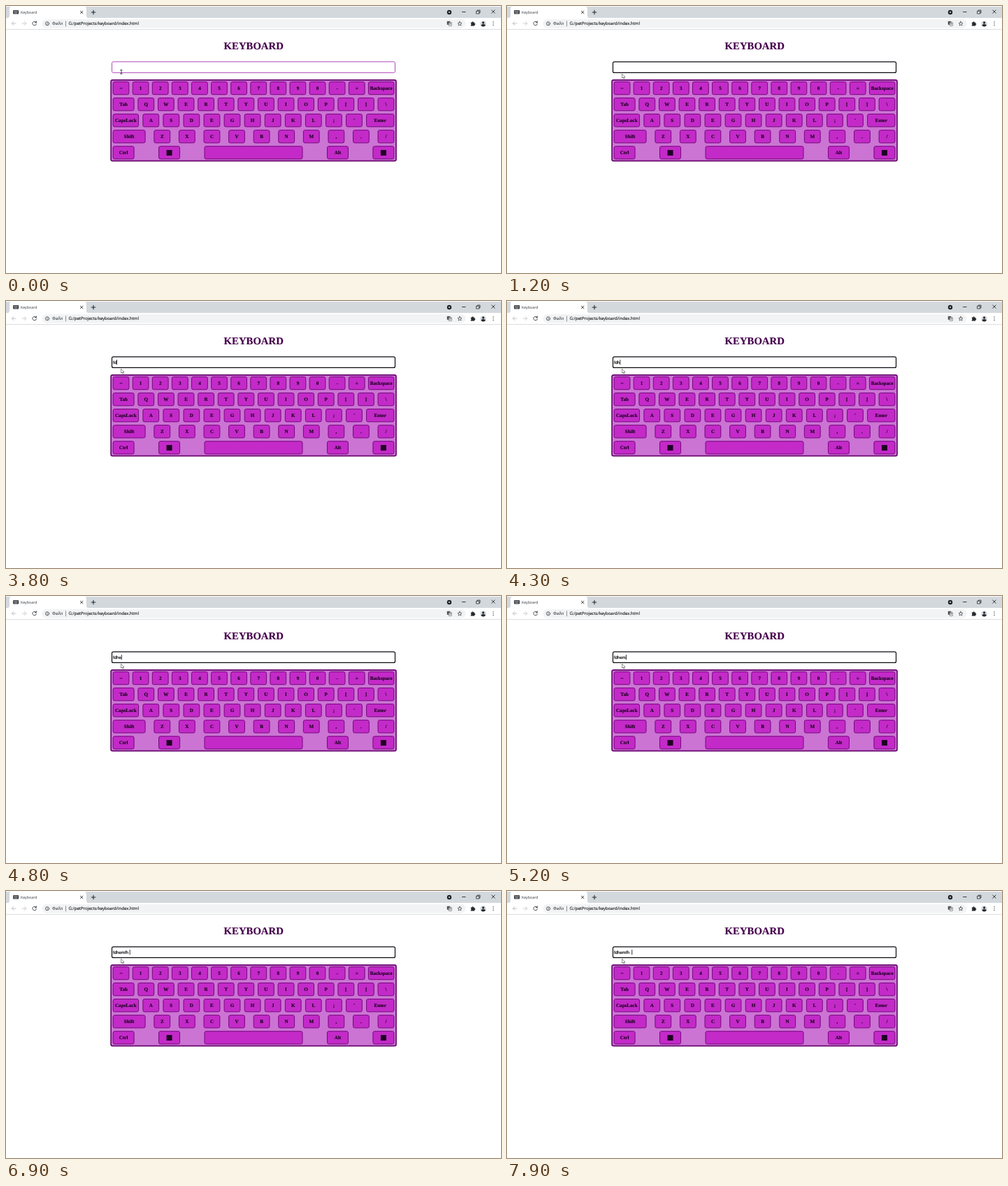
Recreate the animation shown at these times as an HTML page. Size 708x382 px, loop 8 s.

```html
<!DOCTYPE html>
<html lang="en">
<head>
<meta charset="utf-8">
<title>Keyboard</title>
<style>
  html, body { margin: 0; width: 100%; height: 100%; overflow: hidden; background: #fff; }
  svg { display: block; width: 708px; height: 382px; }
  text { text-rendering: geometricPrecision; }
  .ui { font-family: "Open Sans", "Noto Sans", sans-serif; }
  .serif { font-family: "Liberation Serif", "Times New Roman", serif; font-weight: bold; text-anchor: middle; }
  .typed { font: 6.1px "Liberation Sans", Arial, sans-serif; white-space: pre; }
  .line { fill: none; stroke-linecap: round; stroke-linejoin: round; }
</style>
</head>
<body>
<svg viewBox="0 0 708 382">
  <rect width="708" height="382" fill="#fff"/>

  <!-- tab strip -->
  <rect y="1" width="708" height="16" fill="#d2d8dc"/>
  <path d="M2 17Q5 17 5 14V4Q5 1 8 1H112Q115 1 115 4V14Q115 17 118 17Z" fill="#fff"/>
  <rect x="10" y="6" width="8.2" height="5.4" rx=".8" fill="#3c3f44"/>
  <path d="M11.2 7.6H17M11.2 9H17M12.4 10.3H15.8" stroke="#fff" stroke-width=".6" stroke-dasharray="1 .5"/>
  <text class="ui" x="21" y="10.8" font-size="5.3" fill="#34373c">Keyboard</text>
  <g class="line" stroke="#26292d" stroke-width=".9">
    <path d="M106.4 7.2l3.6 3.6m0-3.6l-3.6 3.6"/>
    <path d="M122.2 9h5.6M125 6.2v5.6" stroke-width="1.1"/>
    <path d="M652.5 8.5h4.6"/>
    <path d="M673 7.2h3.8v3.8H673zM674.2 7V6h3.8v3.8h-1" stroke-width=".8"/>
    <path d="M694.7 5.9l4.4 4.4m0-4.4l-4.4 4.4"/>
  </g>
  <circle cx="634" cy="9" r="3.2" fill="#1c1f23"/>
  <path d="M632.5 8.2h3l-1.5 2z" fill="#fff"/>

  <!-- toolbar -->
  <path d="M0 33.5H708" stroke="#dcdee1"/>
  <rect x="51.5" y="19" width="606" height="12.4" rx="6.2" fill="#f1f3f4"/>
  <g class="line" stroke-width=".9">
    <path d="M14 25H8.4m2.6-2.6L8.4 25l2.6 2.6" stroke="#b9bcc0"/>
    <path d="M23.2 25h5.6m-2.6-2.6l2.6 2.6-2.6 2.6" stroke="#c6c9cc"/>
    <path d="M43 23.2a2.8 2.8 0 1 0 .5 2.5M43.4 21.8v2h-2" stroke="#34373c"/>
    <circle cx="59" cy="25.2" r="2.6" stroke="#44474c" stroke-width=".8"/>
    <path d="M59 25v1.4M59 23.8v.1" stroke="#44474c" stroke-width=".8"/>
    <path d="M85.5 21.8v7" stroke="#77797e" stroke-width=".8"/>
    <path d="M649 22.2l.9 2 2.1.2-1.6 1.4.5 2.1-1.9-1.1-1.9 1.1.5-2.1-1.6-1.4 2.1-.2z" stroke="#34373c" stroke-width=".7"/>
  </g>
  <g class="ui" font-size="6.05" stroke-width=".12">
    <text x="66" y="27.4" fill="#54575c" stroke="#54575c">Файл</text>
    <text x="89.5" y="27.4" fill="#17191c" stroke="#17191c">G:/petProjects/keyboard/index.html</text>
  </g>
  <rect x="630.8" y="21.8" width="4.4" height="5" rx=".5" fill="#4c5055"/>
  <rect x="633.2" y="23.4" width="4.2" height="5" rx=".5" fill="#fff" stroke="#4c5055" stroke-width=".6"/>
  <path class="line" d="M634.2 25h2.2m-1.1-.6v.6m.9 0l-1.8 2m.2-1.4l1.5 1.4" stroke="#4c5055" stroke-width=".5"/>
  <path d="M664.8 23.4h1.6a1.1 1.1 0 0 1 2.2 0h1.6v1.5a1.1 1.1 0 0 1 0 2.2v1.5h-5.4v-1.7a1 1 0 0 0 0-1.9z" fill="#26292e"/>
  <circle cx="682.6" cy="25.2" r="4.2" fill="#d5d9de"/>
  <circle cx="682.6" cy="23.9" r="1.6" fill="#26292e"/>
  <path d="M679.4 28q0-2 3.2-2t3.2 2a4.2 4.2 0 0 1-6.4 0z" fill="#26292e"/>
  <path class="line" d="M697 22.7v.01M697 25.1v.01M697 27.5v.01" stroke="#34373c" stroke-width="1.3"/>

  <!-- page -->
  <text class="serif" x="354.2" y="61.5" font-size="14.75" fill="#45004c" stroke="#45004c" stroke-width=".15">KEYBOARD</text>
  <rect id="field" x="151.5" y="79.8" width="405" height="15.6" rx="2" fill="#fff"/>
  <text id="typed" class="typed" x="153" y="89.6" fill="#000" stroke="#000" stroke-width=".15"></text>
  <rect id="caret" y="84" width=".8" height="7.2" fill="#000"/>
  <rect x="150.1" y="105.9" width="407.9" height="115.7" rx="2.2" fill="#cb74d4" stroke="#6a0570" stroke-width="1.7"/>
  <g id="keys" class="serif" font-size="7.1"></g>

  <path id="beam" class="line" d="M-1.2-2.7h2.4M0-2.7v5.4M-1.2 2.7h2.4" stroke="#222" stroke-width=".8"/>
  <path id="arrow" d="M0 0v6.3l1.5-1.3 1 2.2.9-.4-1-2.1h2z" fill="#fff" stroke="#222" stroke-width=".5"/>
</svg>
<script>
const LOOP = 8000, FOCUS = 400, LEAVE = 900, BLINK = 500;
const TEXT = "fdhemfh  ";
const PRESSES = [3300, 3700, 4200, 4700, 5200, 5700, 6200, 6700, 7500];
const EM = { f: .278, d: .556, h: .556, e: .556, m: .833, " ": .278 };
const LEFT = 152.6, INNER = 402.8, KEY = 23.8;
const WIDE = { Backspace: 37.5, Tab: 31, CapsLock: 37.5, Enter: 40.3, Shift: 47, Ctrl: 31, Alt: 31, Win: 31, Space: 141 };
const ROWS = [
  "~ 1 2 3 4 5 6 7 8 9 0 - = Backspace",
  "Tab Q W E R T Y U I O P [ ] \\",
  "CapsLock A S D E G H J K L ; ' Enter",
  "Shift Z X C V B N M , . /",
  "Ctrl Win Space Alt Win"
];

const $ = id => document.getElementById(id);
const [field, typed, caret, beam, arrow] = ["field", "typed", "caret", "beam", "arrow"].map($);

function add(tag, attrs, text = "") {
  const el = document.createElementNS("http://www.w3.org/2000/svg", tag);
  for (const name in attrs) el.setAttribute(name, attrs[name]);
  el.textContent = text;
  $("keys").append(el);
}

// Keys in a row are spread evenly from edge to edge.
ROWS.forEach((row, r) => {
  const labels = row.split(" ");
  const widths = labels.map(label => WIDE[label] || KEY);
  const gap = (INNER - widths.reduce((a, b) => a + b)) / (labels.length - 1);
  const y = 108 + 23.05 * r;
  let x = LEFT;
  labels.forEach((label, i) => {
    const w = widths[i], mid = x + w / 2;
    add("rect", { x: x + .5, y: y + .5, width: w - 1, height: 18.2, rx: 2.3, fill: "#c32ac8", stroke: "#76087c" });
    if (label === "Win") add("rect", { x: mid - 4, y: y + 5.8, width: 8, height: 8, fill: "#200024" });
    else if (label !== "Space") add("text", { x: mid, y: y + 11.5, fill: "#1a001e", stroke: "#1a001e", "stroke-width": .12 }, label);
    x += w + gap;
  });
});

const show = (el, on) => el.setAttribute("visibility", on ? "visible" : "hidden");
const place = (el, x, y) => el.setAttribute("transform", `translate(${x} ${y})`);
const ease = u => (u = Math.min(1, Math.max(0, u)), u * u * (3 - 2 * u));

function draw(t) {
  const focused = t >= FOCUS;
  const count = PRESSES.filter(p => p <= t).length;
  const text = TEXT.slice(0, count);
  const since = t - (count ? PRESSES[count - 1] : FOCUS);
  const width = [...text].reduce((sum, c) => sum + EM[c] * 6.1, 0);

  field.setAttribute("stroke", focused ? "#0c0a10" : "#b14cb8");
  field.setAttribute("stroke-width", focused ? 1.2 : 1);
  typed.textContent = text;
  caret.setAttribute("x", 153 + width);
  show(caret, focused && Math.floor(since / BLINK) % 2 === 0);

  // The pointer goes up into the field, clicks, and drops below it.
  const up = ease(t / FOCUS), down = ease((t - FOCUS) / (LEAVE - FOCUS));
  const x = 164.9 + 2 * (up - down), y = 94.3 - 7 * up + 9.7 * down;
  const inside = y < 96;
  place(beam, x, y);
  place(arrow, x - .3, y);
  show(beam, inside);
  show(arrow, !inside);
}

const start = performance.now();
function tick() {
  draw((performance.now() - start) % LOOP);
  requestAnimationFrame(tick);
}
tick();
</script>
</body>
</html>
```
